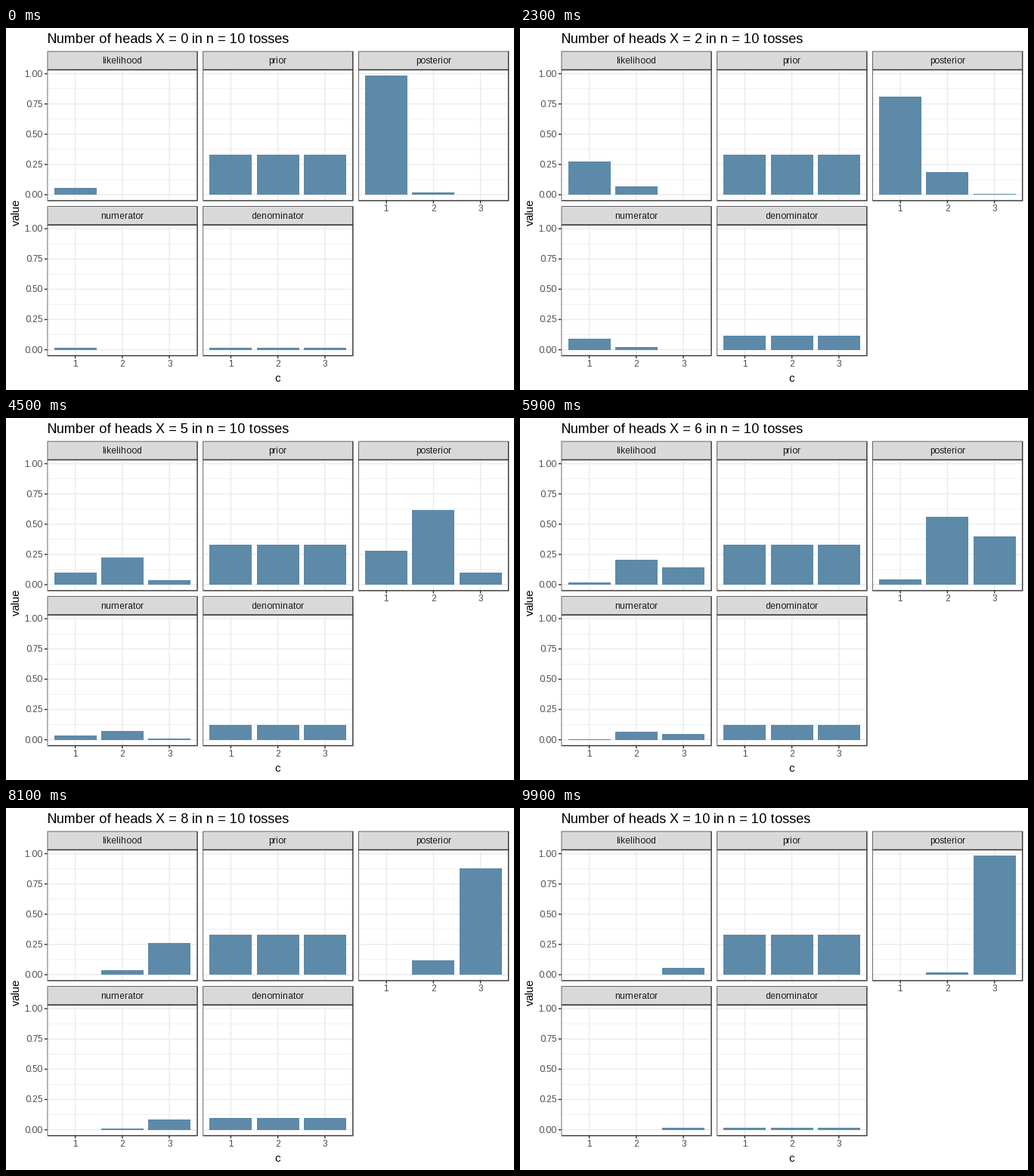
Recreate the animation shown at these times as a matplotlib script. Size 672 by 480 pixels, loop 10000 ms.

```python
from math import comb

import numpy as np
import matplotlib.pyplot as plt
from matplotlib.animation import FuncAnimation
from matplotlib.patches import Rectangle

plt.rcParams.update({
    "font.family": "Liberation Sans",
    "text.hinting": "force_autohint",
    "text.hinting_factor": 1,  # whole-pixel glyph advances
})

W, H, DPI = 672, 480, 96
FRAMES, INTERVAL = 100, 100
N = 10
COINS = (0.25, 0.5, 0.75)
NAMES = ("likelihood", "prior", "posterior", "numerator", "denominator")

PT = DPI / 72
GAP = 5.5 * PT
LEFT, RIGHT = 54.6, W - GAP
TOP, BOTTOM = 30.67, 434.5
STRIP = 24.73
PANEL_W = (RIGHT - LEFT - 2 * GAP) / 3
PANEL_H = (BOTTOM - TOP - GAP - 2 * STRIP) / 2
TICK = 2.75 * PT
LINE = 1.42
INK, GRID, AXIS_TEXT = "#333333", "#EBEBEB", "#4D4D4D"
BAR, STRIP_FILL, STRIP_TEXT = "#5D8AA8", "#D9D9D9", "#1A1A1A"


def bayes():
    """Values as [heads, panel, coin]."""
    x = np.arange(N + 1)[:, None]
    p = np.array(COINS)
    choose = np.array([comb(N, k) for k in range(N + 1)])[:, None]
    like = choose * p**x * (1 - p) ** (N - x)
    prior = np.full_like(like, 1 / 3)
    num = like * prior
    den = np.repeat(num.sum(axis=1, keepdims=True), 3, axis=1)
    return np.stack([like, prior, num / den, num, den], axis=1)


VALUES = bayes()
KEYS = [round(i * (FRAMES - 1) / N) for i in range(N + 1)]

# data ranges with 5% expansion
Y_MAX = VALUES.max()
Y_LO, Y_HI = -0.05 * Y_MAX, 1.05 * Y_MAX
X_LO, X_HI = 0.55 - 0.145, 3.45 + 0.145
UNIT_X = PANEL_W / (X_HI - X_LO)
UNIT_Y = PANEL_H / (Y_HI - Y_LO)

fig = plt.figure(figsize=(W / DPI, H / DPI), dpi=DPI, facecolor="white")
ax = fig.add_axes((0, 0, 1, 1))
ax.set(xlim=(0, W), ylim=(H, 0))
ax.axis("off")


def box(x0, y0, x1, y1, color, z=1, snap=False):
    r = Rectangle((x0, y0), x1 - x0, y1 - y0, facecolor=color,
                  edgecolor="none", linewidth=0, zorder=z, snap=snap)
    return ax.add_patch(r)


def hline(x0, x1, y, color, width=LINE, z=1):
    box(x0, y - width / 2, x1, y + width / 2, color, z)


def vline(x, y0, y1, color, width=LINE, z=1):
    box(x - width / 2, y0, x + width / 2, y1, color, z)


def label(x, y, s, size, color="black", ha="center", **kw):
    return ax.text(x, y, s, fontsize=size, color=color, ha=ha,
                   va="baseline", zorder=5, **kw)


def frame(x0, y0, x1, y1):
    """Border whose outer half is clipped at the left and top."""
    e = LINE / 2
    box(x0, y0, x0 + e, y1 + e, INK, 4)
    box(x1 - e, y0, x1 + e, y1 + e, INK, 4)
    box(x0 + e, y0, x1 - e, y0 + e, INK, 4)
    box(x0 + e, y1 - e, x1 - e, y1 + e, INK, 4)


def panel(i, name):
    row, col = divmod(i, 3)
    x0 = LEFT + col * (PANEL_W + GAP)
    top = TOP + row * (STRIP + PANEL_H + GAP)
    y0 = top + STRIP
    x1, y1 = x0 + PANEL_W, y0 + PANEL_H
    zero = y1 + Y_LO * UNIT_Y

    for v in np.arange(0.125, 1, 0.25):
        hline(x0, x1, zero - v * UNIT_Y, GRID, LINE / 2)
    for v in np.arange(0, 1.1, 0.25):
        y = zero - v * UNIT_Y
        hline(x0, x1, y, GRID)
        if col == 0:
            hline(x0 - TICK, x0, y, INK)
            label(x0 - TICK - 2.2 * PT, y + 4, f"{v:.2f}", 8.8,
                  AXIS_TEXT, ha="right")

    bars = []
    for c in (1, 2, 3):
        x = x0 + (c - X_LO) * UNIT_X
        vline(x, y0, y1, GRID)
        if row == 1 or col == 2:
            vline(x, y1, y1 + TICK, INK)
            label(x, y1 + 14.5, str(c), 8.8, AXIS_TEXT)
        half = 0.45 * UNIT_X
        bars.append(box(x - half, zero, x + half, zero, BAR, 3, snap=True))

    box(x0, top, x1, y0, STRIP_FILL, 2, snap=True)
    frame(x0, top, x1, y0)
    frame(x0, y0, x1, y1)
    label((x0 + x1) / 2, top + 16.7, name, 8.8, STRIP_TEXT)
    return bars


bars = [panel(i, name) for i, name in enumerate(NAMES)]
title = label(LEFT, 20, "", 13.2, ha="left")
label((LEFT + RIGHT) / 2, 469, "c", 11)
label(18, (TOP + STRIP + BOTTOM) / 2, "value", 11,
      rotation=90, rotation_mode="anchor")


def update(k):
    heads = round(k * N / (FRAMES - 1))
    title.set_text(f"Number of heads X = {heads} in n = {N} tosses")
    for i, group in enumerate(bars):
        for j, bar in enumerate(group):
            v = np.interp(k, KEYS, VALUES[:, i, j])
            bar.set_height(-v * UNIT_Y)
    return [title, *(b for group in bars for b in group)]


anim = FuncAnimation(fig, update, frames=FRAMES, interval=INTERVAL,
                     init_func=lambda: update(0), repeat=True,
                     repeat_delay=0, blit=False)
plt.show()
```
